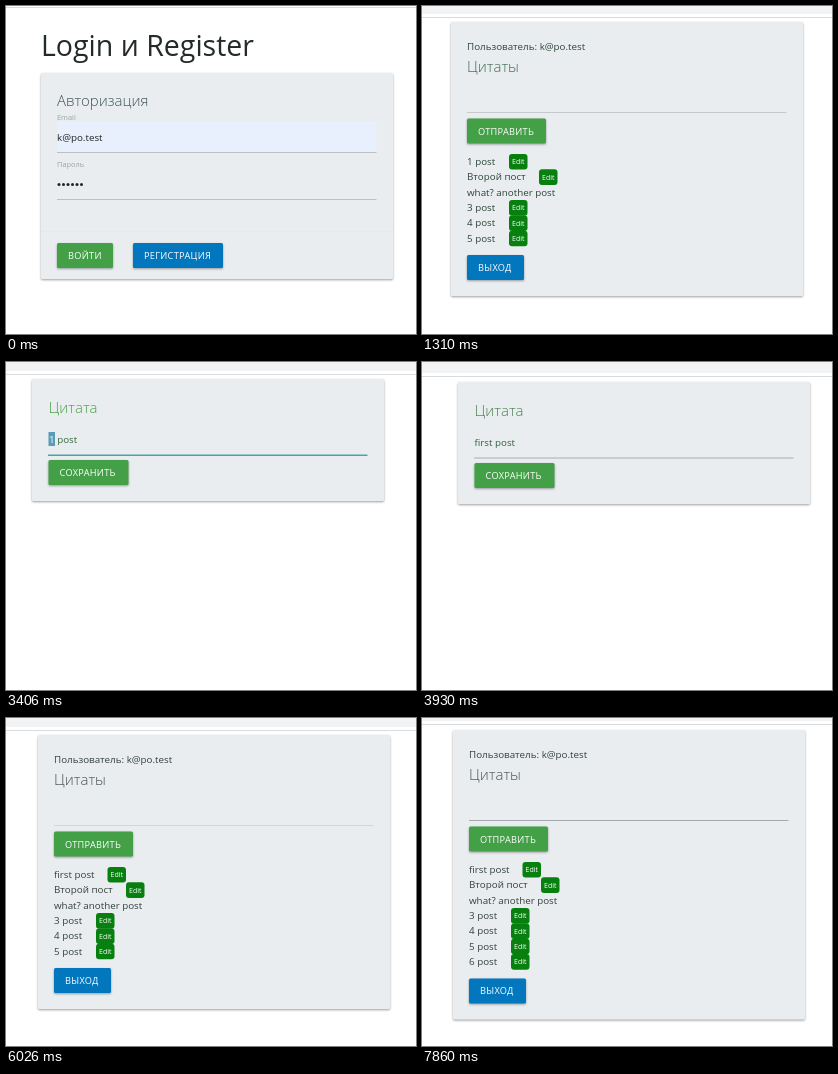
An HTML page for the animation above (9170 ms loop, 410 px wide and 328 px high).

```html
<!DOCTYPE html>
<html lang="ru">
<meta charset="utf-8">
<title>Login</title>
<style>
  html, body { margin: 0; width: 100%; height: 100%; overflow: hidden; background: #fff; }
  svg { display: block; width: 410px; height: 328px; font-family: "Open Sans", "Noto Sans", sans-serif; }
  .card { filter: drop-shadow(0 1px 1px rgba(0, 0, 0, .38)); }
  .button rect { filter: drop-shadow(0 1px 1px rgba(0, 0, 0, .35)); }
  .button text { letter-spacing: .3px; }
</style>
<svg id="stage" viewBox="0 0 410 328"></svg>
<script>
const STEP = 1310;
const GREEN = '#43a047', BLUE = '#0277bd', TEAL = '#4aa3ad', INK = '#33413d';
const EMAIL = 'k@po.test';

const rect = (x, y, w, h, fill, r = 0) =>
  `<rect x="${x}" y="${y}" width="${w}" height="${h}" rx="${r}" fill="${fill}"/>`;
const text = (x, y, size, str, fill = INK, weight = 400) =>
  `<text x="${x}" y="${y}" font-size="${size}" font-weight="${weight}" fill="${fill}">${str}</text>`;
const button = (x, y, w, label, fill) =>
  `<g class="button">${rect(x, y, w, 25, fill, 1.5)}${text(x + 11, y + 16, 9.2, label, '#fff')}</g>`;
const underline = (y, fill, h = 1) => rect(16, y, 319.5, h, fill);

// Browser edge: toolbar remnant and the divider below it
const toolbar = y => rect(0, 0, 410, Math.max(0, y - 3), '#f1f3f4') + rect(0, y, 410, 1, '#d9dbdd');

const page = (divider, x, y, height, content) =>
  toolbar(divider) + `<g transform="translate(${x} ${y})">
    <g class="card">${rect(0, 0, 352, height, '#e9edf0', 1.5)}</g>${content}</g>`;

function login() {
  let dots = '';
  for (let i = 0; i < 6; i++) dots += `<circle cx="${18 + i * 4.5}" cy="111.5" r="1.5" fill="#222"/>`;
  return page(1, 35, 67, 206,
    text(0, -17, 28.5, 'Login и Register', '#222b28') +
    text(16, 33, 15, 'Авторизация', '#3f5557', 300) +
    text(16, 47, 7.4, 'Email', '#9da2a5') +
    rect(16, 48, 319.5, 31, '#e8f0fe') + text(16, 68, 9.8, EMAIL, '#222') + underline(79, '#bcc0c3') +
    text(16, 94, 7.4, 'Пароль', '#9da2a5') + dots + underline(126, '#bcc0c3') +
    rect(0, 158, 352, 1, '#e6eaed') +
    button(16, 170, 56, 'ВОЙТИ', GREEN) + button(92, 170, 90, 'РЕГИСТРАЦИЯ', BLUE));
}

function list(divider, x, y, posts, { line = '#c5c9cb', heading = '#46544f', ink = INK, input = '' } = {}) {
  const rows = posts.map(([label, badgeX], i) => {
    const top = 132 + i * 15.35;
    const badge = badgeX
      ? rect(16 + badgeX, top, 18.5, 15.6, '#078010', 3) + text(19 + badgeX, top + 10.3, 7, 'Edit', '#fff')
      : '';
    return text(16, top + 11, 9.8, label, ink) + badge;
  }).join('');
  const exitY = 141 + posts.length * 15.35;
  return page(divider, x, y, exitY + 41,
    text(16, 28.3, 9.8, 'Пользователь: ' + EMAIL, ink) +
    text(16, 49.5, 15, 'Цитаты', heading, 300) +
    (input && text(16, 79, 9.8, input, '#25332f') + rect(45.5, 68, 1, 14, '#222')) +
    underline(90, line, input ? 1.5 : 1) +
    button(16, 96.5, 79, 'ОТПРАВИТЬ', GREEN) + rows +
    button(16, exitY, 57, 'ВЫХОД', BLUE));
}

const edit = (divider, x, y, heading, line, lineHeight, value) =>
  page(divider, x, y, 122,
    text(16.5, 34, 15, 'Цитата', heading, 300) + value + underline(75.5, line, lineHeight) +
    button(16.5, 81, 80, 'СОХРАНИТЬ', GREEN));

const second = ['Второй пост', 72], numbered = n => [n + ' post', 42];
const tail = [second, ['what? another post'], ...[3, 4, 5].map(numbered)];
const before = [numbered(1), ...tail];
const after = [['first post', 53.5], ...tail];

const scenes = [
  login(),
  list(11, 29, 16, before, { heading: '#3f6b48', ink: '#2d4636' }),
  edit(12, 26, 17, GREEN, TEAL, 1.5,
    rect(16.5, 53, 6.5, 14, '#5a9bb9') + text(17, 64, 9.8, '<tspan fill="#fff">1</tspan> post', '#336b3c')),
  edit(14, 36, 20, '#4a8050', '#a9adaf', 1, text(16.5, 64, 9.8, 'first post', '#2f6238')),
  list(12, 32, 17, after, { line: '#d3d7d9' }),
  list(16, 35, 22, after, { line: TEAL, input: '6 post' }),
  list(6, 31, 12, [...after, numbered(6)], { line: '#a5a9ab' }),
];

const stage = document.getElementById('stage');
let shown = -1;
function draw() {
  const current = Math.floor(performance.now() / STEP) % scenes.length;
  if (current !== shown) stage.innerHTML = scenes[shown = current];
  requestAnimationFrame(draw);
}
draw();
</script>
</html>
```
